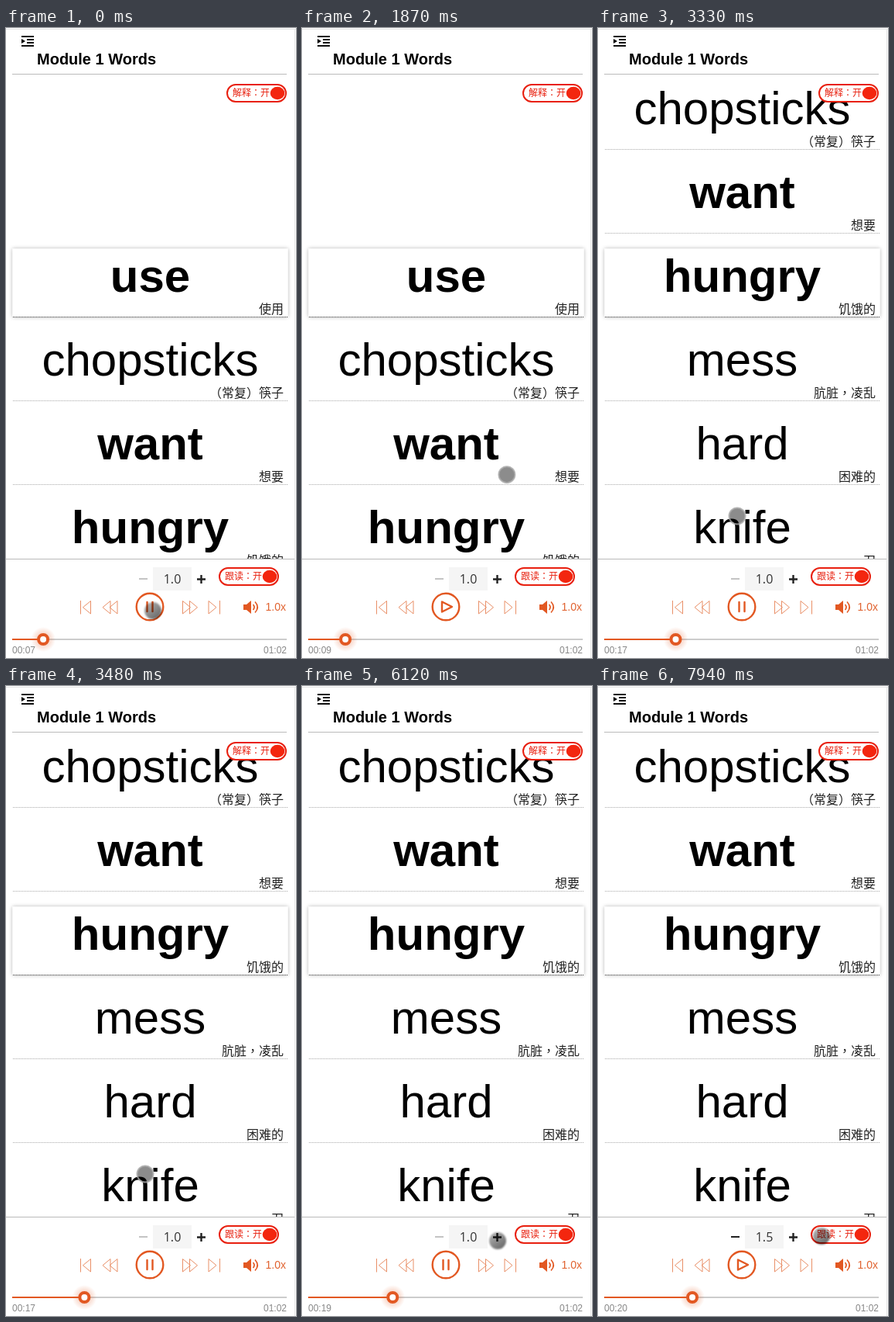
Write an HTML page that moves like this. It is 375x812 px and loops after 8 s.

```html
<!DOCTYPE html>
<html lang="zh-Hant">
<head>
<meta charset="utf-8">
<style>
html, body { margin: 0; width: 100%; height: 100%; overflow: hidden; background: #fff; }
svg { display: block; width: 375px; height: 812px; font-family: "Liberation Sans", Arial, sans-serif; }
.zh { font-family: "Noto Sans CJK TC", "Noto Sans CJK", sans-serif; }
.word { font-size: 60px; text-anchor: middle; }
.thin { fill: none; stroke: #e98f67; stroke-linejoin: round; }
.time { font-size: 12px; fill: #888; }
.line { fill: none; stroke: #e25822; stroke-width: 2.4; stroke-linejoin: round; }
</style>
</head>
<body>
<svg viewBox="0 0 375 812">
  <defs>
    <clipPath id="view"><path d="M0 60H373V684H0Z"/></clipPath>
    <filter id="shadow" x="-5%" y="-15%" width="110%" height="130%">
      <feDropShadow dx="0" dy="0" stdDeviation="2.5" flood-opacity=".32"/>
    </filter>
    <filter id="soft" x="-50%" y="-50%" width="200%" height="200%"><feGaussianBlur stdDeviation="1"/></filter>
    <radialGradient id="glow">
      <stop offset=".5" stop-color="#e25822" stop-opacity=".22"/>
      <stop offset="1" stop-color="#e25822" stop-opacity="0"/>
    </radialGradient>
    <linearGradient id="press" x1=".15" y1=".1" x2=".8" y2=".9">
      <stop offset="0" stop-opacity=".32"/>
      <stop offset="1" stop-opacity=".58"/>
    </linearGradient>
    <path id="left" class="thin" d="M10 -8V8.5L0 0.200Z"/>
    <path id="right" class="thin" d="M0 -8V8.5L10 0.200Z"/>
  </defs>

  <path d="M0 1.5H375M373.5 1V812" stroke="#e4e4e4"/>
  <g clip-path="url(#view)">
    <rect x="8.5" y="284.5" width="356" height="88" fill="#fff" filter="url(#shadow)"/>
    <g id="rows"></g>
    <path d="M9 372.5H365" stroke="#333" stroke-dasharray="1 1"/>
  </g>

  <path d="M20 11H36M27 15H36M27 19H36M20 23H36" stroke="#111" stroke-width="2"/>
  <path d="M20 14V20L25 17Z"/>
  <text x="40" y="47" font-size="20" font-weight="700">Module 1 Words</text>
  <path d="M8 59.5H363" stroke="#bbb"/>

  <path d="M0 684.5H373" stroke="#bbb"/>
  <g id="toggles"></g>

  <path id="minus" d="M172 710H183" stroke-width="2"/>
  <rect x="190" y="695" width="50" height="30" fill="#f5f5f5"/>
  <text id="speed" x="215" y="716" font-size="16" fill="#333" text-anchor="middle" style="font-family:'Open Sans',sans-serif"></text>
  <path d="M247 710.5H258M252.5 705V716" stroke="#222" stroke-width="2.4"/>

  <path class="thin" d="M96.5 738V755.5M276.5 738V755.5"/>
  <use href="#left" x="99.5" y="746.5"/>
  <use href="#left" x="125" y="746.5"/>
  <use href="#left" x="134" y="746.5"/>
  <use href="#right" x="228.5" y="746.5"/>
  <use href="#right" x="237.5" y="746.5"/>
  <use href="#right" x="262" y="746.5"/>
  <circle class="line" cx="186" cy="746" r="17.3"/>
  <path id="pause" class="line" d="M182.5 740V752M189.500 740V752" stroke-linecap="round"/>
  <path id="play" class="line" d="M181 739.5V752.5L194 746Z"/>
  <path d="M307 743H311L317 738V755L311 750H307Z" fill="#e25822"/>
  <path d="M319.5 743Q322.5 746.5 319.5 750M322 739.5Q328.5 746.5 322 753.5" fill="none" stroke="#e25822" stroke-width="1.6"/>
  <text x="335.5" y="751" font-size="14" fill="#e0622f">1.0x</text>

  <path d="M8 788H363" stroke="#ccc" stroke-width="2"/>
  <path id="done" stroke="#e25822" stroke-width="2"/>
  <g id="knob">
    <circle r="16" fill="url(#glow)"/>
    <circle r="6" fill="#fff" stroke="#e25822" stroke-width="4"/>
  </g>
  <text id="now" class="time" x="8" y="806"></text>
  <text class="time" x="333" y="806">01:02</text>

  <g id="touch">
    <circle id="plain" r="10.5" fill-opacity=".45" stroke="#aaa" stroke-opacity=".8" stroke-width="2"/>
    <circle id="pressed" r="11" fill="url(#press)" filter="url(#soft)"/>
  </g>
</svg>
<script>
const $ = id => document.getElementById(id);
const LOOP = 8000, PITCH = 108;
const PAUSE = 1400, SEEK = 3330, FASTER = 6370, STOP = 6910;

// word, meaning, bold
const words = [
  ["use", "使用", true],
  ["chopsticks", "（常复）筷子", false],
  ["want", "想要", true],
  ["hungry", "饥饿的", true],
  ["mess", "肮脏，凌乱", false],
  ["hard", "困难的", false],
  ["knife", "刀", false]
];
$("rows").innerHTML = words.map(([word, meaning, bold], i) => `
  <g transform="translate(0 ${i * PITCH})">
    <text class="word" x="186.5" y="340" font-weight="${bold ? 700 : 400}">${word}</text>
    <text class="zh" x="359" y="368" font-size="16" fill="#222" text-anchor="end">${meaning}</text>
    <path d="M9 372.5H365" stroke="#aaa" stroke-dasharray="1 1"/>
  </g>`).join("");

const toggle = (x, y, label) => `
  <g transform="translate(${x} ${y})">
    <rect x="1" y="1" width="76" height="22" rx="11" fill="#fff" stroke="#e8200f" stroke-width="2"/>
    <text class="zh" x="8" y="16" font-size="12" fill="#e8200f">${label}</text>
    <ellipse cx="66" cy="12" rx="9.3" ry="8.3" fill="#f3260f"/>
  </g>`;
$("toggles").innerHTML = toggle(285, 72, "解释：开") + toggle(275, 695, "跟读：开");

// begin, end, x, y: the touch point rests between moves
const moves = [
  [150, 390, 240, 759], [670, 1300, 189, 749], [1400, 1600, 256, 632], [1600, 1870, 265, 576],
  [1870, 2130, 236, 485], [2130, 2380, 189, 559], [2690, 2930, 180, 629], [4180, 4600, 210, 645],
  [5030, 5720, 253, 715], [7220, 7600, 314, 708], [7600, 7940, 289, 709]
];

const clamp = v => Math.min(1, Math.max(0, v));
const show = (id, on) => $(id).setAttribute("visibility", on ? "visible" : "hidden");
const place = (id, x, y) => $(id).setAttribute("transform", `translate(${x} ${y})`);

function touchAt(t) {
  let x = 190, y = 751;
  for (const [begin, end, toX, toY] of moves) {
    const k = clamp((t - begin) / (end - begin));
    x += (toX - x) * k;
    y += (toY - y) * k;
  }
  return [x, y];
}

// position in the recording, in seconds
const audioAt = t => t < SEEK
  ? 7 + Math.min(t, PAUSE) / 1000
  : 16.15 + (Math.min(t, STOP) - SEEK) * 0.00105;

function draw(t) {
  const playing = t < PAUSE || (t >= SEEK && t < STOP);
  const fast = t >= FASTER;
  place("rows", 0, t < SEEK ? 0 : -3 * PITCH);
  show("pause", playing);
  show("play", !playing);
  $("speed").textContent = fast ? "1.5" : "1.0";
  $("minus").setAttribute("stroke", fast ? "#222" : "#c4c4c4");

  const sec = audioAt(t), knobX = 8 + sec / 62 * 355;
  $("done").setAttribute("d", `M8 788H${knobX}`);
  place("knob", knobX, 788);
  $("now").textContent = "00:" + String(Math.round(sec + 0.4)).padStart(2, "0");

  const [x, y] = touchAt(t), onControls = y > 690;
  place("touch", x, y);
  show("plain", !onControls);
  show("pressed", onControls);
}

const start = performance.now();
function tick() {
  draw((performance.now() - start) % LOOP);
  requestAnimationFrame(tick);
}
tick();
</script>
</body>
</html>
```
